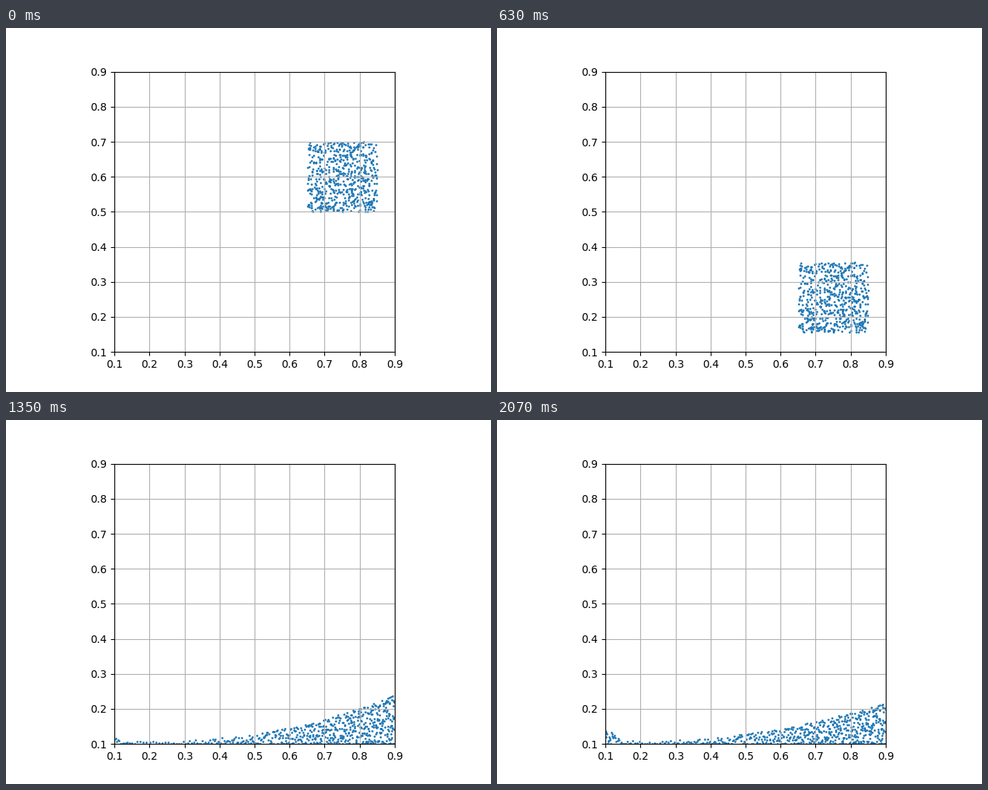
These frames come from a looping animation (640x480 px, 2100 ms). A matplotlib script:

```python
import numpy as np
import matplotlib.pyplot as plt
from matplotlib.animation import FuncAnimation

FRAMES, INTERVAL = 70, 30
N = 600
LEFT, RIGHT, FLOOR = .1, .9, .1
FALL = 7.81e-4            # drop per squared frame
IMPACT, LANDED, SPREAD = 22.7, 29, 37
SHEAR = .4                # how much further the lower grains run out

rng = np.random.default_rng(7)
u, v = rng.random((2, N))
start_x, start_y = .65 + .2 * u, .5 + .2 * v

# Each grain keeps its share of the mass to its left (q) and below it (w)
score = u + SHEAR * v
q = (np.argsort(np.argsort(score)) + .5) / N
low = np.maximum(0, (score - 1) / SHEAR)
high = np.minimum(1, score / SHEAR)
w = (v - low) / (high - low)
w = np.maximum(0, 1.08 * w - .08)

grid = np.linspace(LEFT, RIGHT, 801)


def progress(n, begin, end):
    return np.clip((n - begin) / (end - begin), 0, 1)


def heap(n):
    """Height of the heap along the grid once the block has landed."""
    spread = progress(n, LANDED, SPREAD)
    settle = progress(n, LANDED, FRAMES - 1)
    settle *= settle * (3 - 2 * settle)
    front = max(LEFT, .65 - .04 * (n - IMPACT))
    s = np.clip((grid - front) / (RIGHT - front), 0, 1)
    slope = (.148 - .036 * settle) * s ** (1.1 + 1.5 * spread - .4 * settle)
    pile = .05 * settle * np.exp((LEFT - grid) / .03)
    return slope + pile + .005 * spread * (s > 0)


def settled(n):
    h = heap(n)
    mass = np.cumsum(h)
    x = np.interp(q, mass / mass[-1], grid)
    return x, FLOOR + w * np.interp(x, grid, h)


def positions(n):
    x, y = settled(max(n, LANDED))
    if n < LANDED:
        x = start_x + (x - start_x) * progress(n, IMPACT + 3 * v, LANDED)
        y = np.maximum(y, start_y - FALL * n * n)
    return np.column_stack([x, y])


fig, ax = plt.subplots(figsize=(6.4, 4.8), dpi=100)
ax.set_aspect("equal")
ticks = np.arange(1, 10) / 10
ax.set(xlim=(LEFT, RIGHT), ylim=(.1, .9), xticks=ticks, yticks=ticks)
ax.grid(True)
grains = ax.scatter(start_x, start_y, s=1)


def draw(n):
    grains.set_offsets(positions(n))
    return grains,


anim = FuncAnimation(fig, draw, frames=FRAMES, interval=INTERVAL,
                     repeat=True, repeat_delay=0)
plt.show()
```
